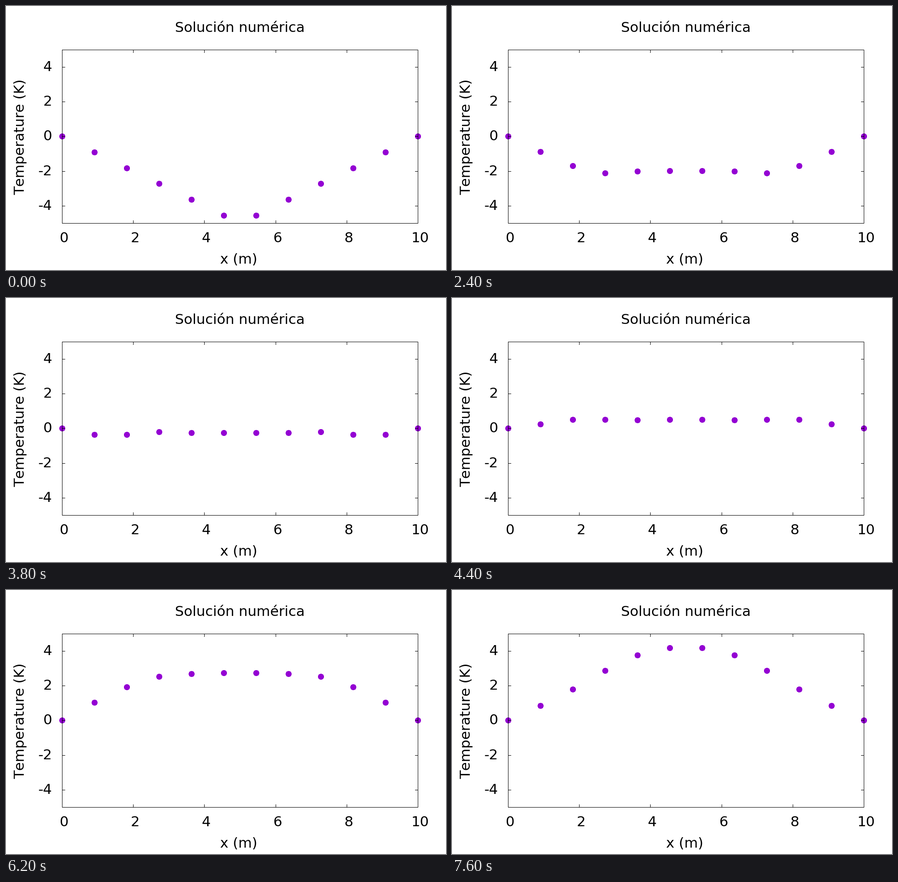
Animation of 966x580 px, one loop 7800 ms. Source, as a matplotlib script:

```python
import numpy as np
import matplotlib.pyplot as plt
from matplotlib.animation import FuncAnimation
from matplotlib.patches import Circle

W, H, DPI = 966, 580, 100
PX = 72 / DPI                       # points per pixel
FRAMES, INTERVAL = 39, 200
LEFT, RIGHT, TOP, BOTTOM = 123.5, 904.5, 96.5, 477.5
TICK = 6
CELLS, LENGTH = 11, 10.0
COURANT = 0.275                     # wave speed * dt / dx

plt.rcParams["font.family"] = "DejaVu Sans"
plt.rcParams["text.kerning_factor"] = 6


def snap(v):
    """Centre of the pixel that holds v."""
    return np.floor(v) + 0.5


def to_x(x):
    return snap(LEFT + (RIGHT - LEFT) * x / LENGTH)


def to_y(u):
    return snap(286.9 - (BOTTOM - TOP) * u / 10)


def solve_wave():
    """Leapfrog solution of a plucked string released from rest."""
    x = np.linspace(0, LENGTH, CELLS + 1)
    u = -np.minimum(x, LENGTH - x)

    def force(v):
        f = np.zeros_like(v)
        f[1:-1] = COURANT ** 2 * (v[2:] - 2 * v[1:-1] + v[:-2])
        return f

    states = [u, u + force(u) / 2]
    while len(states) < FRAMES:
        states.append(2 * states[-1] - states[-2] + force(states[-1]))
    return x, states


fig = plt.figure(figsize=(W / DPI, H / DPI), dpi=DPI, facecolor="white")
ax = fig.add_axes([0, 0, 1, 1])
ax.set_xlim(0, W)
ax.set_ylim(H, 0)
ax.axis("off")


def line(xs, ys):
    ax.plot(xs, ys, color="black", lw=PX, zorder=3, snap=False,
            solid_capstyle="projecting", solid_joinstyle="miter")


def label(x, y, text, ha="center", **kw):
    ax.text(x, y, text, size=30.8 * PX, ha=ha, va="baseline", color="black", **kw)


line([LEFT, RIGHT, RIGHT, LEFT, LEFT], [TOP, TOP, BOTTOM, BOTTOM, TOP])

for v in range(0, 11, 2):
    px = to_x(v)
    if 0 < v < 10:
        line([px, px], [TOP, TOP + TICK])
        line([px, px], [BOTTOM, BOTTOM - TICK])
    label(px + 4.2, 519, str(v))

for v in range(-4, 5, 2):
    py = to_y(v)
    line([LEFT, LEFT + TICK], [py, py])
    line([RIGHT, RIGHT - TICK], [py, py])
    label(101.3, py + 8.7, str(v), ha="right")

label(513, 57, "Solución numérica")
label(511, 566, "x (m)")
label(40, 287.4, "Temperature (K)", rotation=90, rotation_mode="anchor")

grid, states = solve_wave()
dots = [ax.add_patch(Circle((x, 0), 6.05, fc="#9400D3", lw=0,
                            antialiased=False, snap=False, zorder=2))
        for x in to_x(grid + 1e-9)]


def draw(i):
    for dot, y in zip(dots, to_y(states[i])):
        dot.center = dot.center[0], y
    return dots


anim = FuncAnimation(fig, draw, frames=FRAMES, interval=INTERVAL,
                     repeat=True, repeat_delay=0)
plt.show()
```
